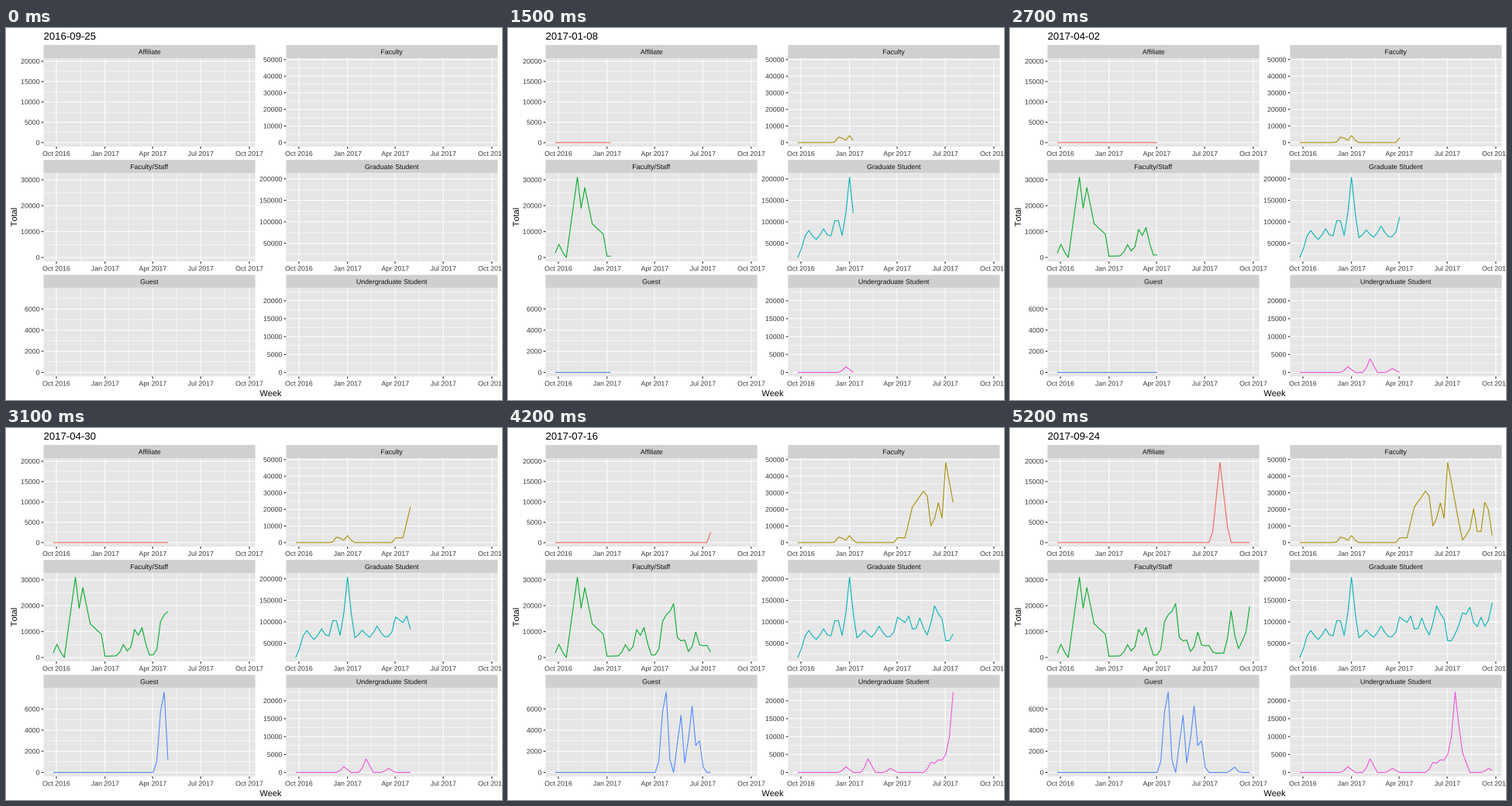
A matplotlib script that plays this animation: 640 by 480 pixels, repeating every 5300 ms.

```python
import numpy as np
import matplotlib.pyplot as plt
from matplotlib.animation import FuncAnimation
from matplotlib.patches import PathPatch, Rectangle
from matplotlib.textpath import TextPath
from matplotlib.transforms import Affine2D

plt.rcParams["font.family"] = "Liberation Sans"
plt.rcParams["text.kerning_factor"] = 6     # practically no kerning
plt.rcParams["path.snap"] = False

W, H, DPI = 640, 480, 100
PX = 72 / DPI                 # points per pixel
WEEKS = 53
START = np.datetime64("2016-09-25")
week_no = np.arange(WEEKS)

LEFTS = (48.5, 361.4)
BOTTOMS = (153.0, 301.3, 449.6)
PANEL_W, PANEL_H, STRIP_H = 273.1, 114.0, 17.1
PAD_X, PAD_Y = PANEL_W / 22, PANEL_H / 22   # 5% of the data range per side

PANEL, STRIP = "#e6e6e6", "#d0d0d0"
AXIS_TEXT, TICK, STRIP_TEXT = "#393939", "#222222", "#0f0f0f"


def series(rise, fall, spikes, trend=((0, 0),)):
    """Weekly totals: a broken-line trend plus triangular spikes.

    Spikes and trend are (week, thousands); rise and fall are the widths
    in weeks of the two sides of each spike.
    """
    base = np.interp(week_no, *zip(*trend))
    total = base.copy()
    for peak, height in spikes:
        d = week_no - peak
        shape = 1 - np.where(d < 0, -d / rise, d / fall)
        total += (height - base) * shape.clip(0)
    return 1000 * total.clip(0)


affiliate = series(2.3, 2.5, [(44, 19.75)])

faculty = series(
    1.5, 1.5,
    [(11.4, 4.5), (14, 4.2), (38, 24), (45, 4.5), (47, 20.3), (50, 20),
     (51, 13)],
    trend=[(26, 0), (27, 2.9), (29, 2.9), (31, 21.5), (34, 31), (35, 28),
           (36, 10), (39, 10), (40, 48.4), (44, 0)])

staff = series(
    1.5, 1.7,
    [(1, 5.1), (19, 5), (22, 10.8), (24, 11.6), (29.3, 17), (30.8, 14),
     (32, 17), (34.5, 9), (38, 9.8), (40.5, 6), (47, 18), (50, 6.4),
     (52, 19.7)],
    trend=[(3, 0), (6, 31), (7, 19), (8, 27), (10, 13), (13, 9), (14, 0.5),
           (52, 2)])

graduate = series(
    1.7, 1.7,
    [(3, 80), (7, 84), (10.5, 120), (14, 204), (18, 81), (22, 90),
     (27.4, 125), (29.8, 120), (33, 109), (37, 137), (39, 122), (40, 35),
     (44, 121), (46, 134), (49, 111), (52, 144)],
    trend=[(0, 17), (2, 58), (52, 75)])

guest = series(2, 1.2, [(29, 2.1), (30, 7.25), (34, 5.4), (37, 6.3), (39, 3),
                        (48, 0.5)])

undergrad = series(1.5, 2, [(13, 1.6), (19, 3.8), (25, 1.1), (36, 2.8),
                            (38, 3.5), (40, 5), (42, 22.4), (44, 5.5),
                            (51, 1.1)])

# name, totals, line colour, spacing of the y breaks
PANELS = [
    ("Affiliate", affiliate, "#f66158", 5000),
    ("Faculty", faculty, "#a88d00", 10000),
    ("Faculty/Staff", staff, "#00ac26", 10000),
    ("Graduate Student", graduate, "#00b2b8", 50000),
    ("Guest", guest, "#4c8aff", 2000),
    ("Undergraduate Student", undergrad, "#f24fdc", 5000),
]

# Quarter starts, as days after the first week
QUARTERS = np.arange("2016-10", "2017-11", 3, dtype="datetime64[M]")
QUARTER_DAYS = (QUARTERS.astype("datetime64[D]") - START).astype(int)
MONTH_NAMES = {1: "Jan", 4: "Apr", 7: "Jul", 10: "Oct"}

fig = plt.figure(figsize=(W / DPI, H / DPI), dpi=DPI, facecolor="white")
ax = fig.add_axes([0, 0, 1, 1])
ax.set(xlim=(0, W), ylim=(H, 0))
ax.axis("off")


def text_path(x, y, s, size, ha="center", angle=0):
    """Outline of a text with its baseline at y, free of pixel rounding."""
    path = TextPath((0, 0), s, size=size)
    ink = path.get_extents()
    shift = {"left": 0, "center": (ink.x0 + ink.x1) / 2, "right": ink.x1}[ha]
    move = Affine2D().translate(-shift, 0).scale(1, -1)
    return move.rotate_deg(-angle).translate(x, y).transform_path(path)


def label(*args, color="black", **kw):
    patch = PathPatch(text_path(*args, **kw), fc=color, lw=0, zorder=6)
    return ax.add_patch(patch)


def seg(x, y, color, width, z):
    return ax.plot(x, y, color=color, lw=width * PX, zorder=z,
                   solid_capstyle="butt", solid_joinstyle="round")[0]


def box(x, y, w, h, color):
    ax.add_patch(Rectangle((x, y), w, h, fc=color, lw=0, zorder=1))


def draw_panel(left, bottom, name, totals, color, step):
    """Draw the fixed parts; return the line and its pixel points."""
    top, right = bottom - PANEL_H, left + PANEL_W
    box(left, top - STRIP_H, PANEL_W, STRIP_H, STRIP)
    box(left, top, PANEL_W, PANEL_H, PANEL)
    label(left + PANEL_W / 2, top - 5.3, name, 8.8, color=STRIP_TEXT)

    lo, hi = totals.min(), totals.max()

    def to_x(day):
        return left + PAD_X + day / (7 * (WEEKS - 1)) * (PANEL_W - 2 * PAD_X)

    def to_y(v):
        return bottom - PAD_Y - (v - lo) / (hi - lo) * (PANEL_H - 2 * PAD_Y)

    for day in (QUARTER_DAYS[:-1] + QUARTER_DAYS[1:]) / 2:
        seg([to_x(day)] * 2, [top, bottom], "white", 0.53, 2)
    for day, quarter in zip(QUARTER_DAYS, QUARTERS):
        x = to_x(day)
        year, month = str(quarter).split("-")
        seg([x, x], [top, bottom], "white", 1.07, 3)
        seg([x, x], [bottom, bottom + 2.75], TICK, 1.07, 3)
        label(x, bottom + 12, f"{MONTH_NAMES[int(month)]} {year}", 8.8,
              color=AXIS_TEXT)

    # Half steps alternate between major and minor grid lines.
    for k in range(12):
        v = k * step // 2
        y = to_y(v)
        if not top < y < bottom:
            continue
        if k % 2:
            seg([left, right], [y, y], "white", 0.53, 2)
        else:
            seg([left, right], [y, y], "white", 1.07, 3)
            seg([left - 2.75, left], [y, y], TICK, 1.07, 3)
            label(left - 5.3, y + 3.1, str(v), 8.8, ha="right",
                  color=AXIS_TEXT)

    line = seg([], [], color, 1.07, 5)
    return line, to_x(7 * week_no), to_y(totals)


def title_path(week):
    return text_path(LEFTS[0], 15, str(START + 7 * week), 13.2, ha="left")


lines = [draw_panel(LEFTS[i % 2], BOTTOMS[i // 2], *panel)
         for i, panel in enumerate(PANELS)]
title = ax.add_patch(PathPatch(title_path(0), fc="black", lw=0))
label((LEFTS[0] + LEFTS[1] + PANEL_W) / 2, 475, "Week", 11)
label(14, (BOTTOMS[0] - PANEL_H + BOTTOMS[2]) / 2, "Total", 11, angle=90)


def update(week):
    title.set_path(title_path(int(week)))
    n = week + 1 if week else 0     # one point makes no line
    for line, x, y in lines:
        line.set_data(x[:n], y[:n])
    return [title] + [line for line, _, _ in lines]


anim = FuncAnimation(fig, update, frames=WEEKS, interval=100, repeat=True,
                     repeat_delay=0, blit=False)
plt.show()
```
